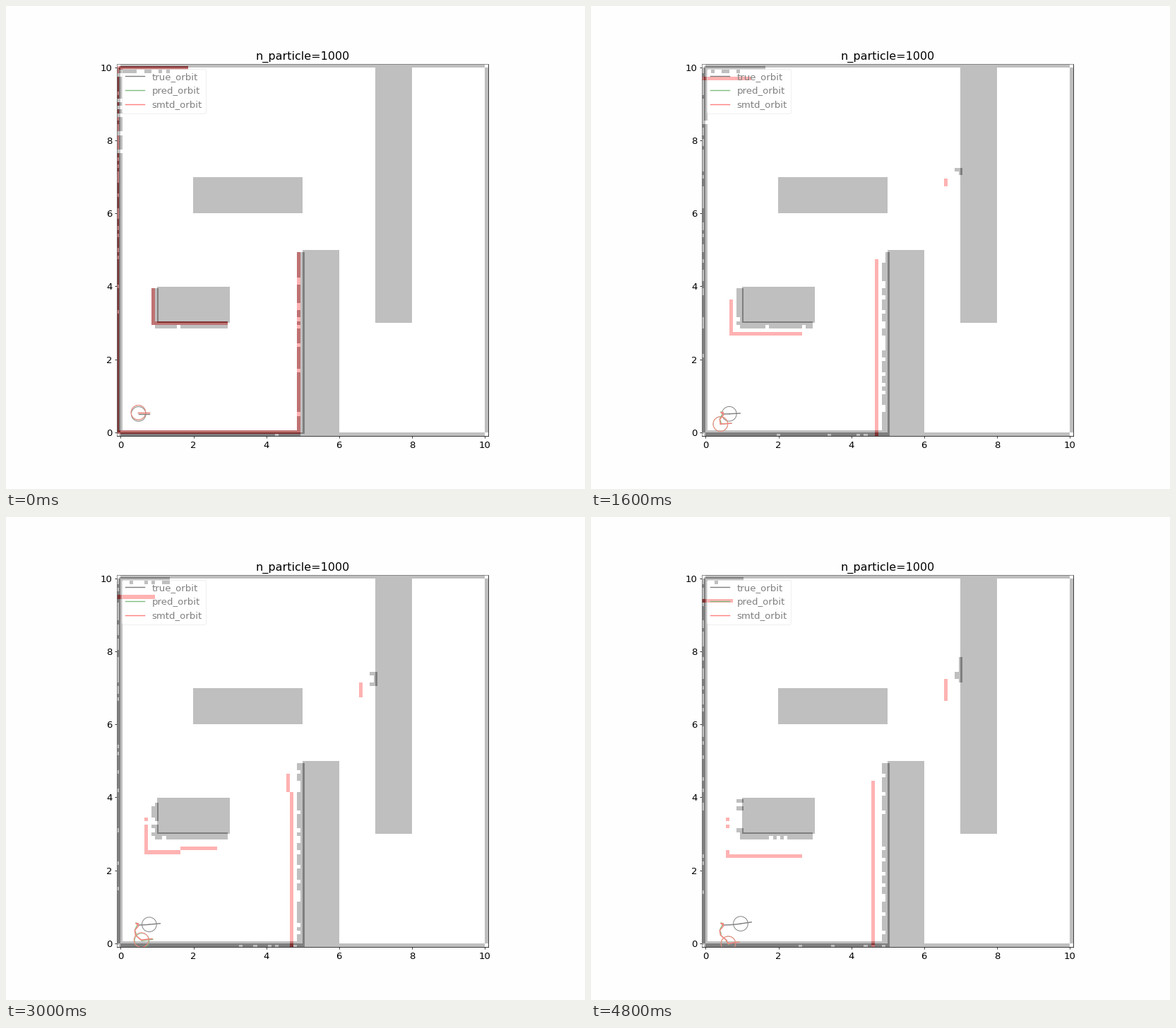
A matplotlib script for the animation above (4.9 s loop, 820x683 px).

```python
import numpy as np
import matplotlib.pyplot as plt
from matplotlib.animation import FuncAnimation

FRAMES = 49
DPI = 64
K = 820 / 12 / DPI  # scale for a 12 inch wide layout

plt.rcParams.update({
    "font.family": "DejaVu Sans",
    "font.size": 14 * K,
    "axes.linewidth": 0.8 * K,
    "axes.titlepad": 6 * K,
    "lines.linewidth": 1.5 * K,
    "patch.linewidth": 1.0 * K,
})
for axis in ("xtick", "ytick"):
    plt.rcParams[axis + ".major.size"] = 3.5 * K
    plt.rcParams[axis + ".major.width"] = 0.8 * K
    plt.rcParams[axis + ".major.pad"] = 3.5 * K

LO, HI = -0.1, 10.1
N = 103     # sensor cells of 0.1, centred on multiples of 0.1
FINE = 204  # half cells on show

# x0, y0, x1, y1
BLOCKS = [(2, 6, 5, 7), (1, 3, 3, 4), (5, 0, 6, 5), (7, 3, 8, 10),
          (0, LO, 10, 0), (0, 10, 10, HI), (LO, 0, 0, 10), (10, 0, HI, 10)]

# time, x, y and heading error of the estimate
WAYPOINTS = np.array([
    (0, .485, .54, 0), (1, .42, .545, 0), (4, .495, .48, .015),
    (8, .385, .35, .033), (16, .405, .225, .012), (21, .475, .16, .013),
    (30, .565, .09, .02), (40, .61, 0, .025), (48, .62, -.01, 0)])


def true_pose(t):
    u = np.asarray(t) / 48
    return .49 + .47 * u, .5 + .035 * u ** 2, .15 * u


def smooth_pose(t):
    x, y, err = (np.interp(t, WAYPOINTS[:, 0], c) for c in WAYPOINTS.T[1:])
    return x, y, true_pose(t)[2] + err


def pred_pose(t):
    x, y, a = smooth_pose(t)
    d = -.025 * np.sin(np.pi * np.asarray(t) / 8)
    return x + d, y - d, a


def make_walls():
    g = np.zeros((FINE, FINE))
    for block in BLOCKS:
        a, c, b, d = (round((v - LO) / .05) for v in block)
        g[c:d, a:b] = 1
    return g


def make_faces():
    """Points along every block side, with the outward normals."""
    pts, normals = [], []
    for block in BLOCKS:
        for ax in (0, 1):
            along = np.arange(block[1 - ax], block[3 - ax], .05)
            for side, sign in ((block[ax], -1), (block[ax + 2], 1)):
                p = np.empty((len(along), 2))
                p[:, ax], p[:, 1 - ax] = side, along
                n = np.zeros_like(p)
                n[:, ax] = sign
                pts.append(p)
                normals.append(n)
    return np.vstack(pts), np.vstack(normals)


WALLS = make_walls()
POINTS, NORMALS = make_faces()


def sense(t, rng):
    """Visible wall points with normals and distances."""
    eye = np.array(true_pose(t)[:2])
    ray = POINTS - eye
    dist = np.hypot(*ray.T)
    facing = -(ray * NORMALS).sum(1) / dist
    seen = facing > 0
    safe = np.where(np.abs(ray) < 1e-9, 1e-9, ray)
    for block in BLOCKS:
        a, b = (block[:2] - eye) / safe, (block[2:] - eye) / safe
        enter = np.minimum(a, b).max(1)
        leave = np.maximum(a, b).min(1)
        seen &= ~((enter < leave - 1e-6) & (enter < .999) & (leave > 0))
    # grazing rays are often lost
    seen &= rng.random(len(ray)) < facing / .11
    return POINTS[seen], NORMALS[seen], dist[seen]


def cells(p):
    i, j = (np.floor(p * 10 + 1e-6).astype(int) + 1).T
    ok = (i >= 0) & (i < N) & (j >= 0) & (j < N)
    g = np.zeros((N, N))
    g[j[ok], i[ok]] = 1
    return np.repeat(np.repeat(g, 2, 0), 2, 1)[1:1 + FINE, 1:1 + FINE]


def to_estimate(p, t):
    tx, ty, ta = true_pose(t)
    ex, ey, ea = smooth_pose(t)
    c, s = np.cos(ea - ta), np.sin(ea - ta)
    return (p - (tx, ty)) @ np.array([[c, s], [-s, c]]) + (ex, ey)


def scene(t):
    rng = np.random.default_rng(100 + t)
    p, n, dist = sense(t, rng)
    # some readings also fall into the next lower cell, more so when near
    spill = rng.random(len(p)) < np.exp(-dist / rng.uniform(3, 9))
    low = (p - .1 * np.abs(n))[spill]
    dark = .25 * (WALLS + cells(np.vstack([p, low])))
    red = cells(to_estimate(p, t))
    rgb = 1 - dark[..., None] - red[..., None] * np.array([0, .3, .3])
    return np.clip(rgb, 0, 1)


class Robot:
    def __init__(self, ax, pose, color, label):
        self.pose = pose
        self.trail, = ax.plot([], [], color=color, label=label)
        self.nose, = ax.plot([], [], color=color)
        self.body = plt.Circle((0, 0), .2, fill=False, ec=color)
        ax.add_patch(self.body)

    def show(self, t):
        xs, ys, _ = self.pose(np.arange(t + 1))
        self.trail.set_data(xs, ys)
        x, y, a = self.pose(t)
        self.nose.set_data([x, x + .3 * np.cos(a)], [y, y + .3 * np.sin(a)])
        self.body.center = (x, y)


fig, ax = plt.subplots(figsize=(820 / DPI, 683 / DPI), dpi=DPI,
                       facecolor="#fefefe")
image = ax.imshow(scene(0), origin="lower", extent=(LO, HI, LO, HI),
                  interpolation="nearest")
robots = [Robot(ax, true_pose, (.5, .5, .5), "true_orbit"),
          Robot(ax, pred_pose, (.5, .75, .5), "pred_orbit"),
          Robot(ax, smooth_pose, (1, .5, .5), "smtd_orbit")]

ax.set_xlim(LO, HI)
ax.set_ylim(LO, HI)
ax.set_xticks(range(0, 11, 2))
ax.set_yticks(range(0, 11, 2))
ax.set_title("n_particle=1000")
for side in ("left", "top"):
    ax.spines[side].set_color("0.45")
ax.legend(loc="upper left", facecolor="none", edgecolor="0.92",
          labelcolor="0.5")


def update(t):
    image.set_data(scene(t))
    for r in robots:
        r.show(t)
    return [image]


anim = FuncAnimation(fig, update, frames=FRAMES, interval=100,
                     repeat=True, repeat_delay=0, blit=False)
plt.show()
```
